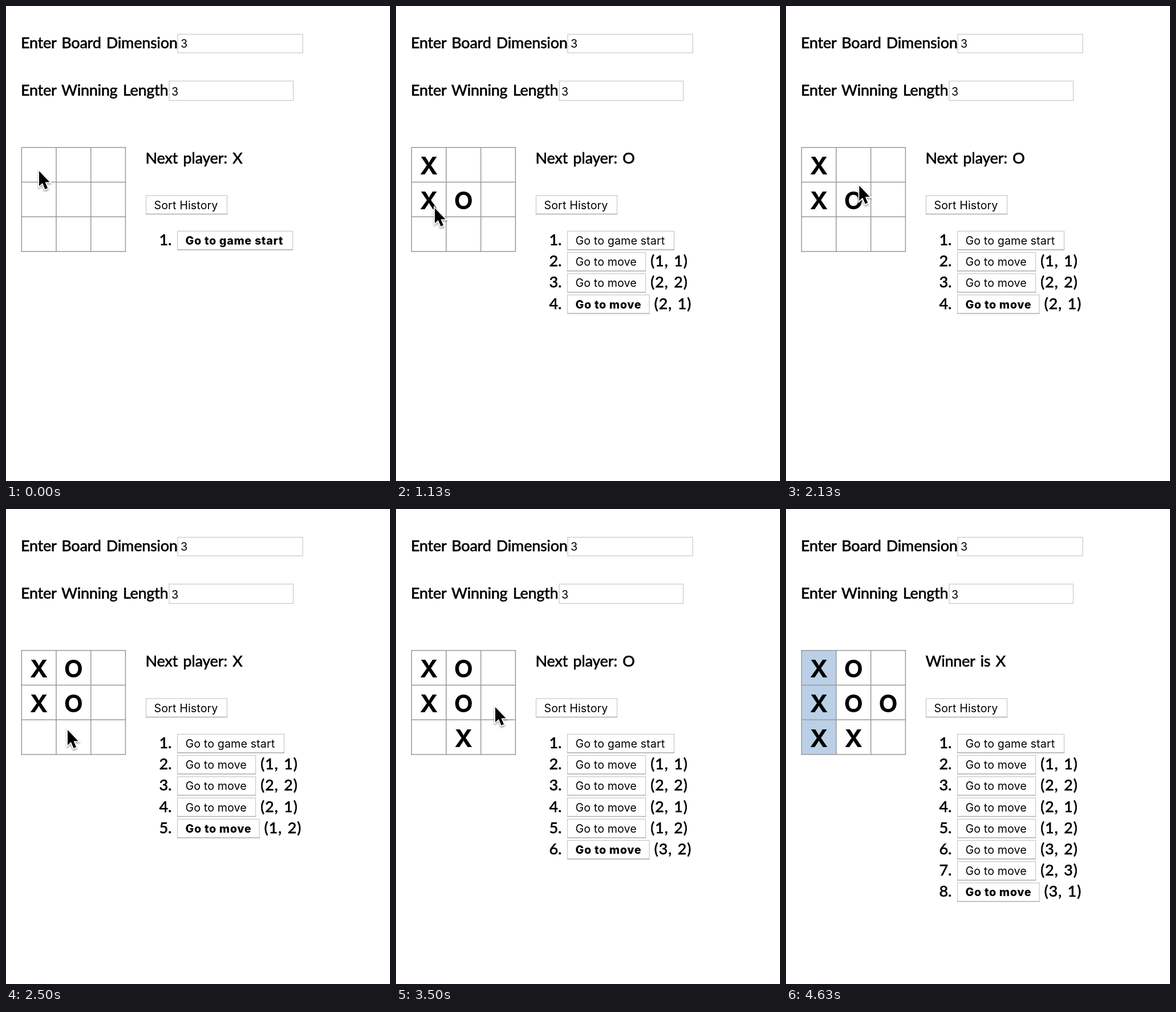
These frames come from a looping animation (673x832 px, 6130 ms). An HTML page:

```html
<!DOCTYPE html>
<html lang="en">
<head>
<meta charset="utf-8">
<title>Tic-tac-toe</title>
<style>
  html, body { margin: 0; width: 100%; height: 100%; overflow: hidden; background: #fff; }
  svg { display: block; }
  text { fill: #000; white-space: pre; }
  .label { font: 500 27px Lato, sans-serif; letter-spacing: -.3px; word-spacing: 2.8px; stroke: #000; stroke-width: .45px; }
  .coord { letter-spacing: .8px; word-spacing: 2px; }
  .num { text-anchor: end; }
  .ui { font: 400 19.6px Inter, sans-serif; letter-spacing: .15px; }
  .now { font-weight: 800; letter-spacing: .75px; }
  .mark { font: 700 43px Inter, sans-serif; text-anchor: middle; }
  .box { fill: #fff; stroke: #cbcbcb; stroke-width: 1.3; }
  .base { stroke: #b3b3b3; stroke-width: 1.5; }
  .grid { fill: none; stroke: #999; stroke-width: 1.5; }
  .win { fill: #bad0e7; }
  #cursor { filter: drop-shadow(0 2px 1.8px rgba(0, 0, 0, .4)); }
  #cursor path { stroke: #fff; stroke-width: 3.6; paint-order: stroke; }
</style>
</head>
<body>
<svg width="673" height="832" viewBox="0 0 673 832">
  <text class="label" x="26" y="74">Enter Board Dimension:</text>
  <rect class="box" x="301" y="49.5" width="219" height="32.5"/>
  <text class="ui" x="306" y="73">3</text>
  <text class="label" x="26" y="157">Enter Winning Length:</text>
  <rect class="box" x="286" y="131.5" width="217.5" height="34"/>
  <text class="ui" x="290" y="157">3</text>
  <g id="game"></g>
  <g id="cursor"><path d="M0 0V26.5L6 21L10.5 32L15 30L10.5 19.5H18.5Z"/></g>
</svg>
<script>
const LOOP = 6130, TICK = 125, HIDE = 37;
const LEFT = 27.3, TOP = 247.8, CELL = 60.7, ROW = 37.2;

// Times are in ticks.
const moves = [
  { at: 1, r: 1, c: 1 }, { at: 5, r: 2, c: 2 }, { at: 9, r: 2, c: 1 }, { at: 18, r: 1, c: 2 },
  { at: 24, r: 3, c: 2 }, { at: 29, r: 2, c: 3 }, { at: 34, r: 3, c: 1 }
];

const start = { x: 58, y: 289 };
const glides = [
  { from: 1, to: 5, x: 115, y: 328 },
  { from: 5, to: 7, x: 68, y: 354 },
  { from: 10, to: 13, x: 175, y: 403 },
  { from: 15, to: 18, x: 112, y: 284 },
  { from: 18, to: 20, x: 108, y: 387 },
  { from: 20, to: 22, x: 113, y: 419 },
  { from: 25, to: 28, x: 174, y: 347 },
  { from: 29, to: 30, x: 40, y: 430 },
  { from: 30, to: 32, x: 63, y: 409 }
];

const game = document.getElementById('game');
const cursor = document.getElementById('cursor');

const ease = u => u * u * (3 - 2 * u);
const clamp = u => Math.min(1, Math.max(0, u));

const text = (cls, x, y, s) => `<text class="${cls}" x="${x}" y="${y}">${s}</text>`;

const button = (x, y, w, s, cls = '') =>
  `<rect class="box" x="${x}" y="${y}" width="${w}" height="32.5"/>` +
  `<path class="base" d="M${x - .6} ${y + 32.5}h${w + 1.2}"/>` +
  text('ui ' + cls, x + 14, y + 23.5, s);

function board(count) {
  const size = 3 * CELL;
  let out = count === moves.length
    ? `<rect class="win" x="${LEFT}" y="${TOP}" width="${CELL}" height="${size}"/>` : '';
  for (let i = 0; i <= 3; i++) {
    const d = i * CELL;
    out += `<path class="grid" d="M${LEFT + d} ${TOP - .7}v${size + 1.4}M${LEFT - .7} ${TOP + d}h${size + 1.4}"/>`;
  }
  moves.slice(0, count).forEach(({ r, c }, i) => {
    out += text('mark', LEFT + (c - .5) * CELL, TOP + (r - .5) * CELL + 17, 'XO'[i % 2]);
  });
  return out;
}

function history(count) {
  let out = '';
  for (let i = 0; i <= count; i++) {
    const y = 394.5 + ROW * i, now = i === count;
    const width = i ? (now ? 143.5 : 137) : (now ? 202 : 187);
    out += text('label num', 290, y + 24.5, `${i + 1}.`);
    out += button(300.5, y, width, i ? 'Go to move' : 'Go to game start', now ? 'now' : '');
    if (i) {
      const { r, c } = moves[i - 1];
      out += text('label coord', 309 + width, y + 24.5, `(${r}, ${c})`);
    }
  }
  return out;
}

function render(count) {
  const status = count === moves.length ? 'Winner is X' : 'Next player: ' + 'XO'[count % 2];
  game.innerHTML = board(count) + text('label', 244.5, 276, status) +
    button(245.5, 332, 142, 'Sort History') + history(count);
}

function pointer(tick) {
  return glides.reduce((p, g) => {
    const u = ease(clamp((tick - g.from) / (g.to - g.from)));
    return { x: p.x + (g.x - p.x) * u, y: p.y + (g.y - p.y) * u };
  }, start);
}

let shown = -1;
function draw() {
  const tick = Math.floor(performance.now() % LOOP / TICK);
  if (tick !== shown) {
    shown = tick;
    render(moves.filter(m => m.at <= tick).length);
    const { x, y } = pointer(tick);
    cursor.setAttribute('transform', `translate(${x} ${y})`);
    cursor.style.visibility = tick < HIDE ? 'visible' : 'hidden';
  }
  requestAnimationFrame(draw);
}
draw();
</script>
</body>
</html>
```
